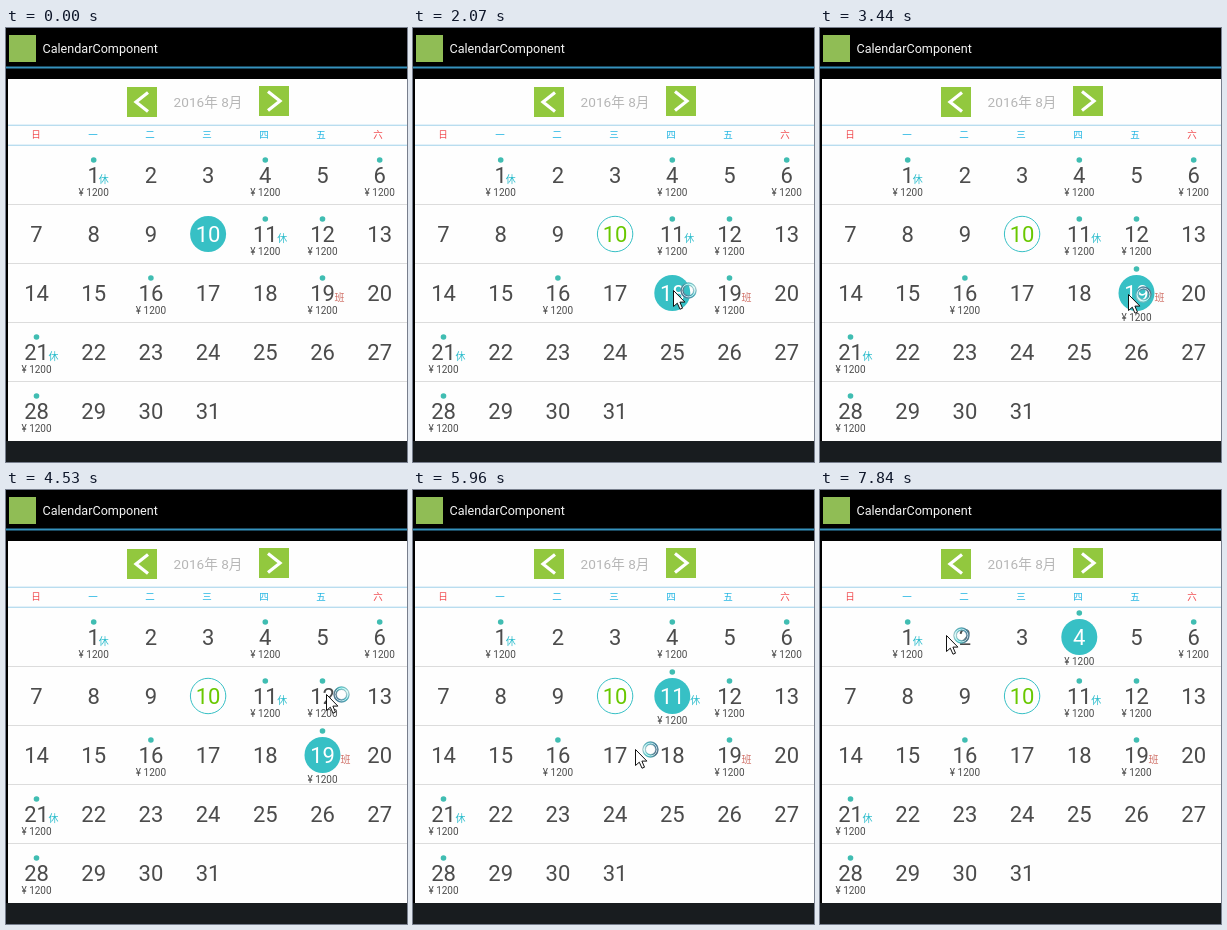
An HTML page with a canvas that plays this animation: 401 by 434 pixels, repeating every 7990 ms.

```html
<!DOCTYPE html>
<html lang="zh">
<head>
<meta charset="utf-8">
<title>CalendarComponent</title>
<style>
  html, body { margin: 0; width: 100%; height: 100%; overflow: hidden; background: #000; }
  canvas { display: block; }
</style>
</head>
<body>
<canvas id="stage" width="401" height="434"></canvas>
<script>
const ctx = document.getElementById('stage').getContext('2d');
const LOOP = 7990;
const CADENCE = 135;
const APPEARS = 280;
const SANS = 'Roboto, "Noto Sans CJK SC", "Noto Sans CJK JP", sans-serif';
const CJK = '"Noto Sans CJK SC", "Noto Sans CJK JP", "Noto Sans CJK", sans-serif';
const TEAL = '#37c0c5', DOT = '#40bdb2', INK = '#4c4c4c', RED = '#f0474b', RULE = '#b9ddef';
const TODAY = 10;
const priced = [1, 4, 6, 11, 12, 16, 19, 21, 28];
const marks = { 1: '休', 11: '休', 19: '班', 21: '休' };

const clicks = [
  { at: 0, day: 10 }, { at: 2070, day: 18 }, { at: 3440, day: 19 },
  { at: 4810, day: 12 }, { at: 5660, day: 11 }, { at: 7060, day: 4 }
];

// Each trip continues from the previous stop; bend is the curve's control point
const home = [313, 392];
const trips = [
  { start: 710, end: 1640, to: [260, 262] },
  { start: 2350, end: 3070, bend: [350, 284], to: [308, 266] },
  { start: 3575, end: 3710, to: [264, 295] },
  { start: 3980, end: 4530, to: [320, 204] },
  { start: 4945, end: 5350, to: [251, 209] },
  { start: 5800, end: 5940, to: [222, 259] },
  { start: 6080, end: 6500, bend: [150, 200], to: [235, 153] },
  { start: 7190, end: 7840, to: [126, 145] }
];

const smooth = p => p * p * (3 - 2 * p);

function rect(x, y, w, h, color) {
  ctx.fillStyle = color;
  ctx.fillRect(x, y, w, h);
}

function disc(x, y, r, color) {
  ctx.fillStyle = color;
  ctx.beginPath();
  ctx.arc(x, y, r, 0, Math.PI * 2);
  ctx.fill();
}

function ring(x, y, r, width, color) {
  ctx.strokeStyle = color;
  ctx.lineWidth = width;
  ctx.beginPath();
  ctx.arc(x, y, r, 0, Math.PI * 2);
  ctx.stroke();
}

function polyline(points) {
  ctx.beginPath();
  points.forEach(([x, y]) => ctx.lineTo(x, y));
}

// Text centred vertically on y
function text(str, x, y, size, color, font = SANS, align = 'center') {
  ctx.font = `${size}px ${font}`;
  ctx.textAlign = align;
  ctx.fillStyle = color;
  ctx.fillText(str, x, y + size * (font === CJK ? 0.38 : 0.355));
}

function arrowButton(x, y, direction) {
  rect(x, y, 30, 30, '#92c83e');
  const midX = x + 15, midY = y + 15, dx = 6 * direction;
  ctx.strokeStyle = '#fff';
  ctx.lineWidth = 3.2;
  polyline([[midX - dx, midY - 9.5], [midX + dx, midY], [midX - dx, midY + 9.5]]);
  ctx.stroke();
}

function drawFrame() {
  rect(0, 0, 401, 434, '#000');
  rect(3, 7, 27, 27, '#90bd55');
  text('CalendarComponent', 36.5, 20.5, 12.6, '#f4f4f4', SANS, 'left');
  rect(0, 38.5, 401, 2, '#3592bd');
  rect(0, 413, 401, 21, '#181c1f');
  rect(2, 51, 399, 362, '#fefefe');
  arrowButton(121, 59, -1);
  arrowButton(253, 58, 1);
  text('2016年 8月', 202, 74, 13.6, '#b6b6b6');
  rect(2, 96.6, 399, 1.4, RULE);
  rect(2, 116.6, 399, 1.4, RULE);
  [...'日一二三四五六'].forEach((name, i) =>
    text(name, 30 + 57 * i, 106, 9.5, i % 6 ? '#1fb4e2' : RED, CJK));
  for (let row = 1; row < 5; row++) rect(2, 117 + 59 * row, 399, 1, '#dcdcdc');
}

function drawDay(day, selected) {
  const x = 30.5 + 57.2 * (day % 7);
  const y = 147 + 59 * Math.floor(day / 7);
  const today = day === TODAY;
  if (selected) disc(x, y, 18, TEAL);
  else if (today) ring(x, y, 17.7, 1, TEAL);
  text(String(day), x, y, 22, selected ? '#fff' : today ? '#69c800' : INK);
  if (priced.includes(day)) {
    disc(x, y - (selected ? 24 : 15), 2.8, DOT);
    text('¥ 1200', x, y + (selected ? 24 : 17.5), 10, INK);
  }
  if (marks[day]) {
    const dx = (day < 10 ? 10 : 17) + (selected ? 6 : 0);
    text(marks[day], x + dx, y + 4, 10, marks[day] === '班' ? '#cf6f66' : '#2bbccc', CJK);
  }
}

function pointerAt(time) {
  let [x, y] = home, rest = APPEARS;
  for (const { start, end, to, bend } of trips) {
    if (time < start) break;
    const steps = Math.round((end - start) / CADENCE) + 1;
    const taken = Math.floor((time - start) / (end - start) * (steps - 1) + 1e-6) + 1;
    const p = smooth(Math.min(1, taken / steps));
    const along = (a, b, i) => {
      const c = bend ? bend[i] : (a + b) / 2;
      return (1 - p) ** 2 * a + 2 * p * (1 - p) * c + p * p * b;
    };
    x = along(x, to[0], 0);
    y = along(y, to[1], 1);
    rest = Math.min(time, end);
  }
  return { x: Math.round(x), y: Math.round(y), turn: Math.floor(rest / CADENCE) };
}

function drawPointer({ x, y, turn }) {
  const cx = x + 15.5, cy = y + 0.5;
  const sweep = ctx.createConicGradient(turn * 0.9, cx, cy);
  ['#2fd0cd', '#c9f7f1', '#35b9c4', '#2b6c8e', '#35566f', '#2fd0cd']
    .forEach((color, i) => sweep.addColorStop(i / 5, color));
  ring(cx, cy, 6.5, 3, sweep);
  ring(cx, cy, 7.7, 0.6, '#7797a5');
  ring(cx, cy, 6.4, 1, 'rgba(240,252,253,.8)');
  ring(cx, cy, 5, 0.6, '#7797a5');

  ctx.save();
  ctx.translate(x + 0.5, y + 0.5);
  polyline([[0, 0], [0, 16], [3.8, 12.7], [6.5, 18.7], [9, 17.7], [6.4, 11.6], [11.4, 11.6]]);
  ctx.closePath();
  ctx.fillStyle = '#fff';
  ctx.fill();
  ctx.strokeStyle = '#111';
  ctx.lineWidth = 1;
  ctx.stroke();
  ctx.restore();
}

function render(elapsed) {
  const time = elapsed % LOOP;
  const current = clicks.filter(({ at }) => time >= at).pop().day;
  drawFrame();
  for (let day = 1; day <= 31; day++) drawDay(day, day === current);
  if (time >= APPEARS) drawPointer(pointerAt(time));
}

const begin = performance.now();
function tick() {
  render(performance.now() - begin);
  requestAnimationFrame(tick);
}
tick();
</script>
</body>
</html>
```
